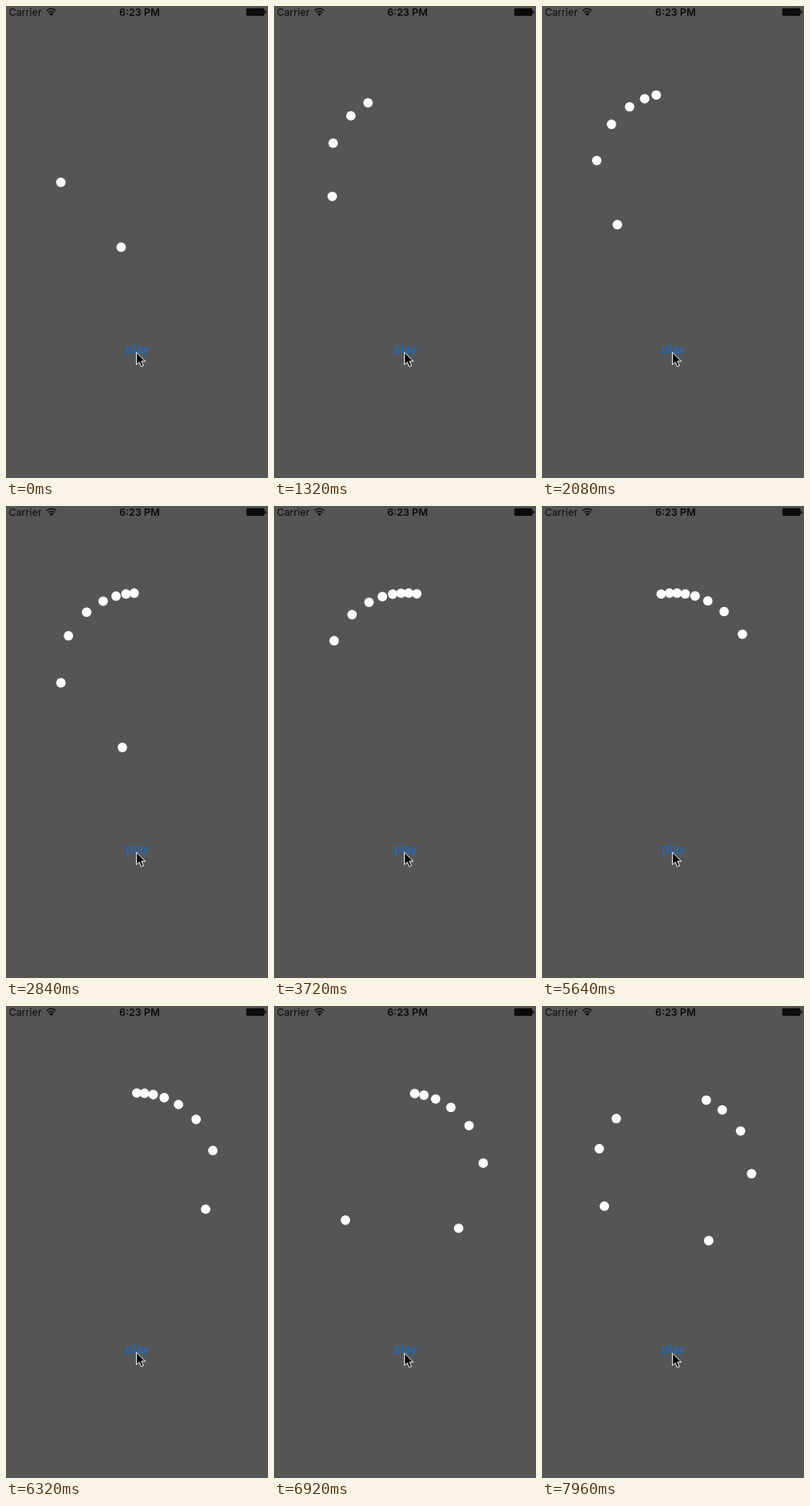
These frames come from a looping animation (320x575 px, 8 s). An HTML page:

```html
<!DOCTYPE html>
<html lang="en">
<head>
<meta charset="utf-8">
<title>Dot spinner</title>
<style>
  html, body { margin: 0; width: 100%; height: 100%; overflow: hidden; background: #555; }
  svg { display: block; width: 100%; height: 100%; }
  text { font-family: Inter, "Liberation Sans", sans-serif; }
</style>
</head>
<body>
<svg viewBox="0 0 320 575">
  <rect width="320" height="575" fill="#555"/>
  <g fill="#0b0b0b">
    <text x="3.6" y="11.8" font-size="12.2">Carrier</text>
    <text x="163" y="11.8" font-size="12.3" font-weight="600" text-anchor="middle">6:23 PM</text>
    <path d="M55.5 12.2 L53.2 9.7 A3.3 3.3 0 0 1 57.8 9.7 Z"/>
    <g fill="none" stroke="#0b0b0b" stroke-width="1.5">
      <path d="M51.6 8 A5.6 5.6 0 0 1 59.4 8"/>
      <path d="M49.6 5.7 A8.5 8.5 0 0 1 61.4 5.7"/>
    </g>
    <rect x="293.5" y="2.8" width="22.2" height="9.2" rx="1.6"/>
    <path d="M316.4 5.4 q1.7 .4 1.7 2 t-1.7 2 z"/>
  </g>
  <text x="161" y="422.6" font-size="14.4" text-anchor="middle" fill="#1670d2">play</text>
  <g id="dots" fill="#fff"></g>
  <path id="cursor" fill="#000" stroke="#fff" stroke-width="1" stroke-linejoin="round"
    d="M159.3 421.8 V437 L162.8 433.8 L165.2 439.4 L167.9 438.2 L165.5 432.8 H170.2 Z"/>
</svg>
<script>
const LOOP = 8000, STEP = 40;
const COUNT = 8, TURN = 7180, STAGGER = 474, FIRST_START = -524;
const CENTER = { x: 161, y: 201 }, RADIUS = 95;

const cursor = document.getElementById('cursor');
const dots = Array.from({ length: COUNT }, () => {
  const dot = document.createElementNS('http://www.w3.org/2000/svg', 'circle');
  dot.setAttribute('r', 5.8);
  return document.getElementById('dots').appendChild(dot);
});

const bezier = (u, a, b) => 3 * u * (1 - u) ** 2 * a + 3 * u * u * (1 - u) * b + u ** 3;

// Fast, slow, fast: cubic-bezier(.15, .8, .85, .2)
function ease(p) {
  let low = 0, high = 1;
  for (let i = 0; i < 30; i++) {
    const mid = (low + high) / 2;
    if (bezier(mid, .15, .85) < p) low = mid; else high = mid;
  }
  return bezier(low, .8, .2);
}

function draw(time) {
  dots.forEach((dot, i) => {
    const age = time - FIRST_START - i * STAGGER;
    dot.style.visibility = age < 0 ? 'hidden' : 'visible';
    if (age < 0) return;
    const angle = 2 * Math.PI * ease(age % TURN / TURN);
    dot.setAttribute('cx', CENTER.x - RADIUS * Math.sin(angle));
    dot.setAttribute('cy', CENTER.y + RADIUS * Math.cos(angle));
  });
  cursor.setAttribute('transform', `translate(0 ${time < 6800 ? 0 : 1})`);
}

let start;
function tick(now) {
  start ??= now;
  const time = Math.max(0, now - start) % LOOP;
  draw(Math.floor((time + 1) / STEP) * STEP % LOOP);
  requestAnimationFrame(tick);
}
draw(0);
requestAnimationFrame(tick);
</script>
</body>
</html>
```
